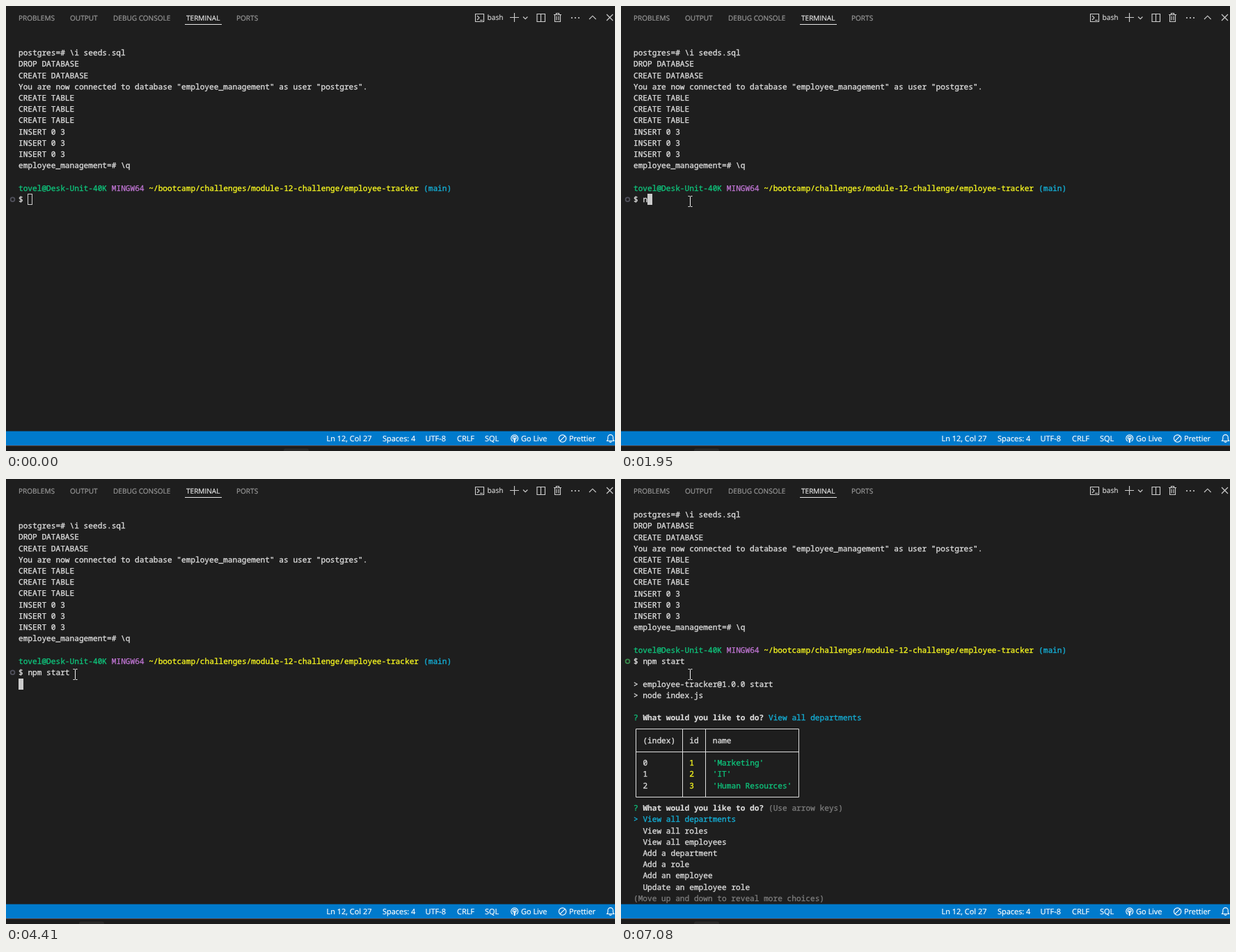
An HTML page that plays this animation: 875x640 px, repeating every 8 s.

```html
<!DOCTYPE html>
<html lang="en">
<head>
<meta charset="utf-8">
<title>Terminal session</title>
<style>
html, body { margin: 0; width: 100%; height: 100%; overflow: hidden; background: #1e1e1e; }
svg { display: block; width: 875px; height: 640px; }
text { white-space: pre; text-rendering: geometricPrecision; fill: currentColor; stroke: currentColor; stroke-width: .2; }
#term text { font: 11.15px "Noto Sans Mono", "DejaVu Sans Mono", monospace; stroke-width: .32; }
#term text.bold { font-weight: 700; stroke-width: .1; }
.tab { font: 10.05px "Open Sans", "Noto Sans", sans-serif; color: #9a9a9a; }
.tab.active { color: #e7e7e7; }
.shell { font: 10.2px "Open Sans", "Noto Sans", sans-serif; color: #d4d4d4; }
.status { font: 10.95px "Open Sans", "Noto Sans", sans-serif; color: #ffffff; }
.icon { fill: none; stroke: #cccccc; stroke-width: 1.15; }
.icon.white { stroke: #ffffff; }
</style>
</head>
<body>
<svg viewBox="0 0 875 640">
  <rect width="875" height="640" fill="#1e1e1e"/>
  <g id="term">
    <circle id="mark" cx="9.5" cy="278.2" r="2.9" fill="none" stroke="#51515c" stroke-width="1.7"/>
  </g>

  <g id="tabs">
    <path d="M257 26.5H310" stroke="#e7e7e7"/>
  </g>
  <text class="shell" x="691.5" y="20">bash</text>
  <g class="icon">
    <path d="M674.5 11.5h12v11h-12zM677 14l3 3-3 3M681 20.5h4"/>
    <path d="M724 16.5h13M730.5 10v13M743 15.5l3.2 3.2 3.2-3.2"/>
    <path d="M763 11.5h11.5v11H763zM768.5 11.5v11"/>
    <path d="M787 12.5h11M790.5 12v-1.5h4V12M788.5 12.5v10h8v-10M791 14.5v6M794 14.5v6"/>
    <path d="M838 19l4.8-4.8 4.8 4.8M863 12l9 9M872 12l-9 9"/>
  </g>
  <g fill="#cccccc">
    <circle cx="813" cy="17" r="1.1"/><circle cx="818" cy="17" r="1.1"/><circle cx="823" cy="17" r="1.1"/>
  </g>

  <rect y="611.5" width="875" height="20.5" fill="#007acc"/>
  <g id="status"></g>
  <g class="icon white">
    <path d="M728 626a5 5 0 1 1 5.4 0M729.2 623.3a2.5 2.5 0 1 1 3 0"/>
    <path d="M730.7 621v7" stroke-width="2.2"/>
    <circle cx="799.6" cy="622" r="5.2"/>
    <path d="M796 625.6l7.2-7.2"/>
    <path d="M863.5 625.5l1.3-2.2v-3a3.7 3.7 0 0 1 7.4 0v3l1.3 2.2zM867 626.5a1.6 1.6 0 0 0 3 0"/>
  </g>
  <rect y="632" width="875" height="8" fill="#1c1c1c"/>
  <rect y="632" width="875" height="1" fill="#5c4036"/>
  <rect id="app" x="399" y="636.5" width="36" height="8" rx="3" fill="#2a2a2a"/>

  <path id="beam" d="M-3 -7.5H-1L0 -6.8L1 -7.5H3M0 -6.8V6.8M-3 7.5H-1L0 6.8L1 7.5H3" fill="none" stroke="#f2f2f2"/>
  <path id="arrow" d="M0 0V16L3.7 12.6L6 18L8.3 17L6 11.7H11.3Z" fill="#ffffff" stroke="#000000" stroke-width=".8"/>
</svg>
<script>
const LOOP = 8000, CELL = 6.69, LINE = 16.23, LEFT = 18, TOP = 67.5, SCROLL = 16;
const C = { fg: "#dedede", green: "#0fc47c", purple: "#bd74d0", yellow: "#f8f820",
            cyan: "#14b0d8", teal: "#12908a", dim: "#7c7c7c" };
const $ = id => document.getElementById(id);
const term = $("term");

function add(parent, tag, attrs, content = "") {
  const el = document.createElementNS("http://www.w3.org/2000/svg", tag);
  for (const key in attrs) el.setAttribute(key, attrs[key]);
  el.textContent = content;
  parent.append(el);
  return el;
}
const colX = col => LEFT + col * CELL;
const rowY = row => TOP + row * LINE;
const show = (el, on) => el.setAttribute("visibility", on ? "visible" : "hidden");

function write(parent, row, col, str, color = C.fg, cls = "") {
  return add(parent, "text", { x: colX(col), y: rowY(row) + 3.6, color, class: cls }, str);
}

function ask(parent, row, mark) {
  write(parent, row, 0, "?", mark);
  write(parent, row, 2, "What would you like to do?", C.fg, "bold");
}

function menu(parent, row, mark) {
  ask(parent, row, mark);
  write(parent, row, 29, "(Use arrow keys)", C.dim);
  write(parent, row + 1, 0, ">", C.cyan);
  ["View all departments", "View all roles", "View all employees", "Add a department",
   "Add a role", "Add an employee", "Update an employee role"]
    .forEach((item, i) => write(parent, row + 1 + i, 2, item, i ? C.fg : C.cyan));
  write(parent, row + 8, 0, "(Move up and down to reveal more choices)", C.dim);
}

function table(parent, row) {
  const mid = col => Math.floor(colX(col) + CELL / 2) + .5;
  const line = r => Math.floor(rowY(r)) + .5;
  const [x0, x1, x2, x3] = [0, 10, 15, 35].map(mid);
  const [y0, y1, y2] = [row, row + 2, row + 6].map(line);
  add(parent, "path", { fill: "none", stroke: C.fg,
    d: `M${x0} ${y0}H${x3}V${y2}H${x0}ZM${x0} ${y1}H${x3}M${x1} ${y0}V${y2}M${x2} ${y0}V${y2}` });
  write(parent, row + 1, 2, "(index)");
  write(parent, row + 1, 12, "id");
  write(parent, row + 1, 17, "name");
  ["Marketing", "IT", "Human Resources"].forEach((name, i) => {
    write(parent, row + 3 + i, 2, i);
    write(parent, row + 3 + i, 12, i + 1, C.yellow);
    write(parent, row + 3 + i, 17, `'${name}'`, C.green);
  });
}

[["PROBLEMS", 18], ["OUTPUT", 92], ["DEBUG CONSOLE", 154], ["TERMINAL", 259], ["PORTS", 331]]
  .forEach(([label, x]) => add($("tabs"), "text",
    { x, y: 20.6, class: label === "TERMINAL" ? "tab active" : "tab" }, label));

[["Ln 12, Col 27", 460.5], ["Spaces: 4", 541], ["UTF-8", 602.5], ["CRLF", 648],
 ["SQL", 688], ["Go Live", 740], ["Prettier", 809]]
  .forEach(([label, x]) => add($("status"), "text", { x, y: 626.3, class: "status" }, label));

["postgres=# \\i seeds.sql", "DROP DATABASE", "CREATE DATABASE",
 'You are now connected to database "employee_management" as user "postgres".',
 "CREATE TABLE", "CREATE TABLE", "CREATE TABLE", "INSERT 0 3", "INSERT 0 3", "INSERT 0 3",
 "employee_management=# \\q"].forEach((str, row) => write(term, row, 0, str));
write(term, 12, 0, "tovel@Desk-Unit-40K", C.green);
write(term, 12, 20, "MINGW64", C.purple);
write(term, 12, 28, "~/bootcamp/challenges/module-12-challenge/employee-tracker", C.yellow);
write(term, 12, 87, "(main)", C.cyan);
write(term, 13, 0, "$");
const typed = write(term, 13, 2, "");

const script = add(term, "g", {});
write(script, 15, 0, "> employee-tracker@1.0.0 start");
write(script, 16, 0, "> node index.js");

const firstMenu = add(term, "g", {});
menu(firstMenu, 18, C.teal);

const answer = add(term, "g", {});
ask(answer, 18, C.green);
write(answer, 18, 29, "View all departments", C.cyan);
table(answer, 19);
menu(answer, 26, C.green);

const caret = add(term, "rect", {});

// [time, letters typed]
const KEYS = [[0, 0], [1950, 1], [2210, 3], [2480, 4], [2680, 5], [2810, 6], [3080, 7], [3210, 8], [3480, 9]];
const T = { move: 400, step: 68.8, focus: 1090, app: 1160, enter: 4410, run: 5350, menu: 5680, answer: 7080 };

function drawCaret(t, count) {
  const focused = t >= T.focus, inset = focused ? 0 : .5;
  const [row, col] = t >= T.run ? [18, 0] : t >= T.enter ? [14, 0] : [13, 2 + count];
  const box = { x: Math.round(colX(col)) + inset, y: Math.round(rowY(row) - 8) + inset,
                width: 7 - 2 * inset, height: 16 - 2 * inset,
                fill: focused ? "#cccccc" : "none", stroke: focused ? "none" : "#cccccc" };
  for (const key in box) caret.setAttribute(key, box[key]);
  show(caret, t < T.menu);
}

function pointerAt(t) {
  if (t < 190) return [422, 650];
  if (t < T.move) return [t < 260 ? 422 : 427, 638];
  const k = Math.min(9, Math.floor((t - T.move) / T.step)) / 9;
  const u = 1 - (1 - k) ** 1.8, v = 1 - u;
  const curve = (a, b, c) => v * v * a + 2 * u * v * b + u * u * c;
  return [curve(606, 330, 99.5), curve(634, 235, 281)];
}

function drawPointer(t) {
  const [x, y] = pointerAt(t), inTerminal = y < 611;
  const move = `translate(${Math.floor(x) + (inTerminal ? .5 : 0)} ${Math.round(y)})`;
  $("beam").setAttribute("transform", move);
  $("arrow").setAttribute("transform", move);
  show($("beam"), inTerminal);
  show($("arrow"), !inTerminal);
}

function render(t) {
  const count = KEYS.filter(key => key[0] <= t).pop()[1];
  const done = t >= T.answer;
  typed.textContent = "npm start".slice(0, count);
  drawCaret(t, count);
  drawPointer(t);
  show(script, t >= T.run);
  show(firstMenu, t >= T.menu && !done);
  show(answer, done);
  term.setAttribute("transform", `translate(0 ${done ? -SCROLL : 0})`);
  $("mark").setAttribute("stroke", done ? "#3a8a4c" : "#51515c");
  $("app").setAttribute("x", t >= T.app ? 105 : 399);
}

const start = performance.now();
function tick() {
  render((performance.now() - start) % LOOP);
  requestAnimationFrame(tick);
}
tick();
</script>
</body>
</html>
```
